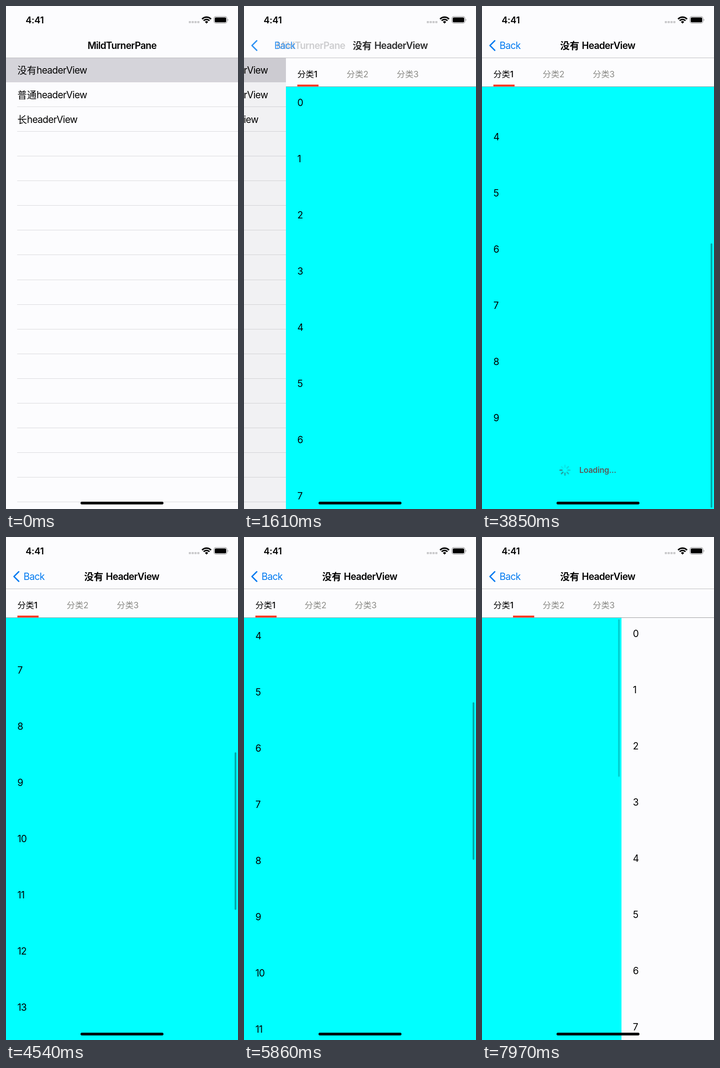
Animation, 509 px wide and 1101 px high, one loop 7.99 s. Source, as an HTML page:

```html
<!DOCTYPE html>
<html lang="zh">
<head>
<meta charset="utf-8">
<title>Paging list</title>
<style>
  html, body { margin: 0; width: 100%; height: 100%; overflow: hidden; background: #fcfcfe; }
  svg { display: block; width: 100vw; height: 100vh; }
  text { font: 400 20.9px Inter, "Noto Sans CJK SC", "Noto Sans CJK", sans-serif; white-space: pre; }
  .latin { letter-spacing: -.7px; }
  .title { font-weight: 600; }
  .tab { font-size: 18.4px; fill: #8a8a86; }
  .tab.on { font-weight: 500; fill: #000; letter-spacing: -.2px; }
  .paper { fill: #fcfcfe; }
  .blue { fill: #007af0; }
</style>
</head>
<body>
<svg viewBox="0 0 509 1101" preserveAspectRatio="none">
  <defs>
    <clipPath id="viewport"><rect y="177" width="509" height="924"/></clipPath>
    <clipPath id="fan"><path d="M440 38.5L426 24.5V18H454V24.5Z"/></clipPath>
  </defs>
  <rect class="paper" width="509" height="1101"/>

  <g id="menu">
    <rect y="113" width="509" height="54" fill="#d5d4da"/>
  </g>
  <rect id="dim" y="113" width="509" height="988" opacity="0"/>

  <g id="page">
    <rect class="paper" y="113" width="509" height="988"/>
    <g clip-path="url(#viewport)">
      <g id="slider">
        <rect y="177" width="509" height="924" fill="#0ff"/>
        <g id="rows">
          <g id="footer">
            <g id="spinner"></g>
            <text class="title" x="213.5" y="1439" fill="#5a5a5a" style="font-size:17.2px;letter-spacing:-.2px">Loading...</text>
          </g>
        </g>
        <rect id="bar" x="501.6" width="3.7" rx="1.85"/>
        <g id="nextRows" transform="translate(509 0)">
          <rect class="paper" y="177" width="509" height="924"/>
        </g>
      </g>
    </g>
    <text class="tab on" x="25" y="156">分类1</text>
    <text class="tab" x="133" y="156">分类2</text>
    <text class="tab" x="243" y="156">分类3</text>
    <rect y="176" width="509" height="1" fill="#9a9a9c"/>
    <rect id="marker" x="25" y="172" width="46.5" height="4" fill="#ff3b26"/>
  </g>

  <rect class="paper" width="509" height="113"/>
  <rect y="113" width="509" height="1" fill="#bcbcbe"/>
  <text id="menuTitle" class="latin title" x="254.5" y="93.5" text-anchor="middle">MildTurnerPane</text>
  <text id="pageTitle" class="title" y="93.5"><tspan x="171.5">没有</tspan><tspan class="latin" x="219">HeaderView</tspan></text>
  <path id="chevron" d="M28 76L17.5 86.5L28 97" fill="none" stroke="#007af0" stroke-width="3" stroke-linecap="round" stroke-linejoin="round"/>
  <text id="back" class="latin blue" x="38.5" y="93.5">Back</text>

  <text class="title" x="43" y="37.7" style="font-size:20px;letter-spacing:-.2px">4:41</text>
  <g id="signal" fill="#c9c9cb"></g>
  <g clip-path="url(#fan)" fill="none" stroke="#000" stroke-width="3.2">
    <circle cx="440" cy="37.5" r="13.2"/>
    <circle cx="440" cy="37.5" r="8.2"/>
    <circle cx="440" cy="37.5" r="2.2" stroke-width="4.4"/>
  </g>
  <rect x="456.2" y="23.2" width="28.6" height="14.4" rx="4.2" fill="none" stroke="#929294" stroke-width="1.2"/>
  <rect x="458" y="25" width="25" height="10.8" rx="2.6"/>
  <path d="M486.3 28q3 2.4 0 4.8z" fill="#929294"/>
  <rect x="163.5" y="1085" width="182" height="6" rx="3"/>
</svg>
<script>
const LOOP = 7990, STEP = 10, WIDTH = 509, VIEW = 924, ROW = 123, TRACK = 918, TRACK_TOP = 180;
const $ = id => document.getElementById(id);

function add(parent, tag, attrs, text = '') {
  const el = document.createElementNS('http://www.w3.org/2000/svg', tag);
  for (const key in attrs) el.setAttribute(key, attrs[key]);
  el.textContent = text;
  parent.append(el);
  return el;
}

for (let n = 2; n <= 18; n++)
  add($('menu'), 'rect', { x: 24.5, y: Math.floor(112.4 + n * 54.07), width: WIDTH, height: 1, fill: '#d9d9dc' });
[['没有', 67], ['普通', 67], ['长', 46]].forEach(([word, x], i) => {
  const y = 147.5 + i * 54.1;
  add($('menu'), 'text', { x: 25, y }, word);
  add($('menu'), 'text', { x, y, class: 'latin' }, 'headerView');
});

const addRow = (parent, n) =>
  add(parent, 'text', { x: 25, y: 218.5 + n * ROW, class: 'latin' }, String(n));
const rows = Array.from({ length: 20 }, (_, n) => addRow($('rows'), n));
for (let n = 0; n < 8; n++) addRow($('nextRows'), n);

for (let n = 0; n < 4; n++)
  add($('signal'), 'rect', { x: 401 + n * 6.2, y: 33, width: 4.8, height: 4.6, rx: 1 });
const spokes = Array.from({ length: 8 }, (_, n) => add($('spinner'), 'rect', {
  x: -1.6, y: -12.3, width: 3.2, height: 7.4, rx: 1.6, fill: '#3c5050',
  transform: `translate(182 1433) rotate(${n * 45})`
}));

// Keys are [time, value, ease-out power of the segment that ends there].
function track(keys, t) {
  if (t <= keys[0][0]) return keys[0][1];
  for (let i = 1; i < keys.length; i++) {
    const [t0, v0] = keys[i - 1], [t1, v1, power = 1] = keys[i];
    if (t < t1) return v1 + (v0 - v1) * (1 - (t - t0) / (t1 - t0)) ** power;
  }
  return keys.at(-1)[1];
}

const scrollKeys = [
  [2630, 0], [2650, 14], [2770, 60, 1.4], [2980, 60], [3770, 402, 2.2],
  [3820, 402], [3850, 417], [4170, 560, 1.5], [4340, 560], [5120, 1020, 2.2],
  [5310, 1020], [6100, 445, 2.2], [6120, 445], [6880, 0, 2.2]
];
const swipeKeys = [[7700, 0], [7720, 8], [7840, 92], [7970, 203, 1.1]];
const barKeys = [[2630, 0], [2650, .35], [7710, .35], [7970, .2]];

function pushProgress(t) {
  const s = (t - 1371) / 1000;
  if (s <= 0) return 0;
  if (t >= 1950) return 1;
  return 1 - (1 + 13.1 * s) * Math.exp(-13.1 * s);
}

const move = (id, x, y = 0) => $(id).setAttribute('transform', `translate(${x} ${y})`);
const fade = (id, opacity) => $(id).setAttribute('opacity', opacity);

function drawPush(p) {
  const rest = 1 - p;
  move('page', Math.round(WIDTH * rest));
  move('menu', -153 * p);
  fade('dim', .055 * p);
  move('menuTitle', -132 * p);
  fade('menuTitle', rest);
  move('pageTitle', 371 * rest);
  fade('pageTitle', p);
  move('back', 155 * rest);
  fade('back', p);
  fade('chevron', p);
}

function drawList(t) {
  const scroll = track(scrollKeys, t), loaded = t >= 4000;
  const count = loaded ? 20 : 10, content = count * ROW;
  move('rows', 0, -scroll);
  rows.forEach((row, n) => row.setAttribute('visibility', n < count ? 'visible' : 'hidden'));
  $('footer').setAttribute('visibility', loaded ? 'hidden' : 'visible');
  const head = Math.floor((t - 3850) / 125) + 6;
  spokes.forEach((spoke, n) => {
    const age = ((head - n) % 8 + 8) % 8;
    spoke.setAttribute('opacity', Math.max(.1, .6 - age * .08));
  });

  // The scroll bar shrinks against the end of its track on overscroll.
  const over = Math.max(0, scroll - (content - VIEW));
  const height = TRACK * VIEW / content - over;
  const top = over ? TRACK_TOP + TRACK - height : TRACK_TOP + scroll * TRACK / content;
  $('bar').setAttribute('y', top);
  $('bar').setAttribute('height', height);
  fade('bar', track(barKeys, t));
}

function draw(now) {
  const t = Math.floor(now % LOOP / STEP) * STEP, swipe = track(swipeKeys, t);
  drawPush(pushProgress(t));
  drawList(t);
  move('slider', -Math.round(swipe));
  move('marker', swipe / WIDTH * 108);
}

const start = performance.now();
function tick() {
  draw(performance.now() - start);
  requestAnimationFrame(tick);
}
tick();
</script>
</body>
</html>
```
